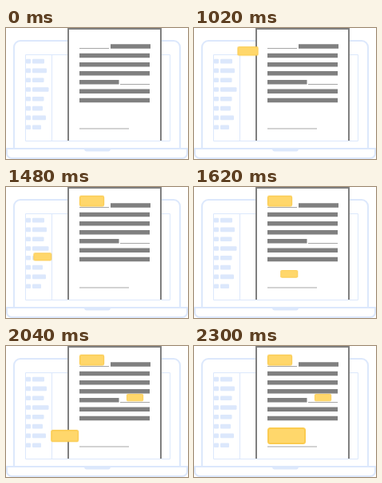
An HTML page that plays this animation: 228x164 px, repeating every 3.64 s.

```html
<!DOCTYPE html>
<html lang="en">
<head>
<meta charset="utf-8">
<title>Filling in a document</title>
<style>
  html, body { margin: 0; width: 100%; height: 100%; overflow: hidden; background: #fff; }
  .stage { position: relative; width: 228px; height: 164px; overflow: hidden; }
  svg { position: absolute; inset: 0; display: block; }
  .outline { fill: #fff; stroke: #dce8fc; }
  .soft { fill: #dce8fc; }
  .page { fill: #fff; stroke: #7f7f7f; stroke-width: 2; }
  .text { stroke: #808080; stroke-width: 5.4; fill: none; }
  .blank { stroke: #a6a6a6; stroke-width: 1; fill: none; }

  /* Tags share one shape; each has its own path, landing scale and timing.
     Scaling uses transform, which applies inside the offset path. */
  .tag {
    position: absolute; left: 0; top: 0; box-sizing: border-box;
    width: 48px; height: 21px;
    border: 2px solid #fbcb4f; border-radius: 3.5px; background: #ffd76b;
    offset-rotate: 0deg; offset-distance: 0%;
    transform: scale(.48); opacity: 0;
    animation: 3640ms linear infinite;
  }
  .name  { --size: .65; offset-path: path("M36 39C71 42 104 -14 107.5 17.5"); animation-name: move-name, show-name; }
  .date  { --size: .44; offset-path: path("M34.5 86.2C104 90 161 153 161.5 64.5"); animation-name: move-date, show-date; }
  .sign  { --size: 1;   offset-path: path("M35.5 112.5L116 112.5"); animation-name: move-sign, show-sign; }

  /* 800 to 1280 ms */
  @keyframes move-name {
    0%, 21.978% { offset-distance: 0%; transform: scale(.48); animation-timing-function: cubic-bezier(.65, 0, .35, 1); }
    35.165%, 100% { offset-distance: 100%; transform: scale(var(--size)); }
  }
  @keyframes show-name { 0%, 21.978% { opacity: 0; } 23.626%, 100% { opacity: 1; } }

  /* 1350 to 1880 ms */
  @keyframes move-date {
    0%, 37.088% { offset-distance: 0%; transform: scale(.48); animation-timing-function: cubic-bezier(.65, 0, .35, 1); }
    51.648%, 100% { offset-distance: 100%; transform: scale(var(--size)); }
  }
  @keyframes show-date { 0%, 37.088% { opacity: 0; } 38.736%, 100% { opacity: 1; } }

  /* 1885 to 2300 ms */
  @keyframes move-sign {
    0%, 51.786% { offset-distance: 0%; transform: scale(.48); animation-timing-function: cubic-bezier(.4, 0, .3, 1); }
    63.187%, 100% { offset-distance: 100%; transform: scale(var(--size)); }
  }
  @keyframes show-sign { 0%, 51.786% { opacity: 0; } 53.434%, 100% { opacity: 1; } }
</style>
</head>
<body>
<div class="stage">
  <svg width="228" height="164" viewBox="0 0 228 164">
    <path class="outline" stroke-width="2" d="M10 151V24a8 8 0 0 1 8-8H210a8 8 0 0 1 8 8V151"/>
    <path class="outline" d="M24.5 33.5H205.5V141.5H24.5ZM57.5 33.5V141.5"/>
    <path class="outline" stroke-width="2" d="M1 151H227V157a6 6 0 0 1-6 6H7a6 6 0 0 1-6-6Z"/>
    <path class="soft" d="M98 151H131a3 3 0 0 1-3 3.5H101a3 3 0 0 1-3-3.5Z"/>
    <g class="soft" id="menu"></g>
    <path class="page" d="M78 141V1H194V141"/>
    <path class="text" d="M131 23H181M92 34.5H180M92 45.7H180M92 56.7H180M92 67.7H141.5M92 79.2H180M92 90.5H180"/>
    <path class="blank" d="M92 25.5H129M143 70.5H180M92 126H154"/>
  </svg>
  <div class="tag name"></div>
  <div class="tag date"></div>
  <div class="tag sign"></div>
</div>
<script>
  const menu = document.getElementById("menu");
  const addRect = (x, y, width, height) => {
    const rect = document.createElementNS(menu.namespaceURI, "rect");
    Object.entries({ x, y, width, height, rx: 1 }).forEach(([key, value]) => rect.setAttribute(key, value));
    menu.append(rect);
  };
  [15, 18, 14.5, 20.5, 14.5, 13, 17, 11].forEach((width, row) => {
    const y = 38.8 + row * 11.8;
    addRect(25, y, 6, 5.6);
    addRect(33, y, width, 5.6);
  });
</script>
</body>
</html>
```
